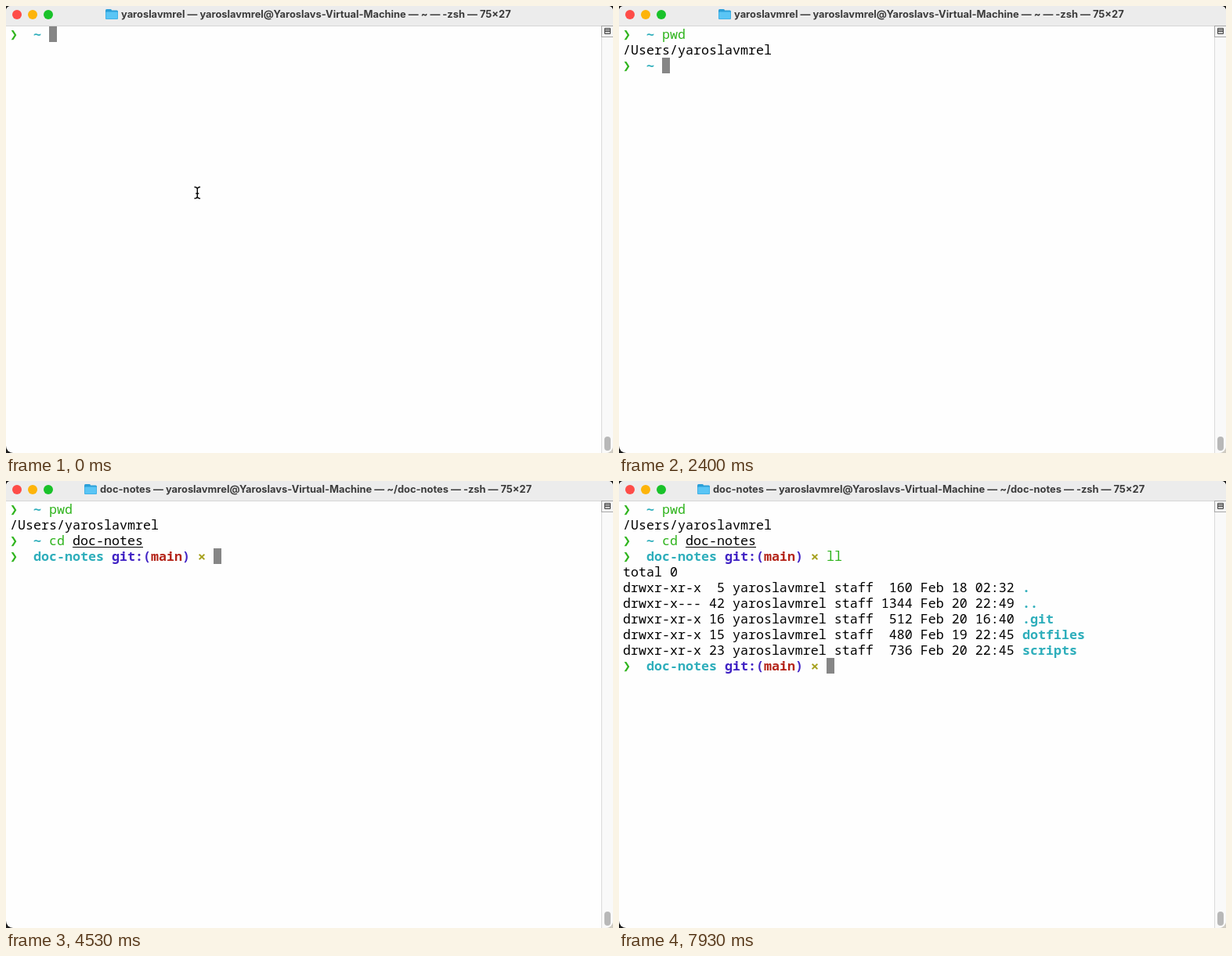
These frames come from a looping animation (775 by 571 pixels, 8000 ms). An HTML page with a canvas:

```html
<!DOCTYPE html>
<html lang="en">
<head>
<meta charset="utf-8">
<title>Terminal</title>
<style>
  html, body { margin: 0; width: 100%; height: 100%; overflow: hidden; background: #1c1c1c; }
  canvas { display: block; }
</style>
</head>
<body>
<canvas id="stage" width="775" height="571"></canvas>
<script>
const ctx = document.getElementById('stage').getContext('2d');
const LOOP = 8000, CELL = 10, ROW = 20, LEFT = 5, TOP = 26;
const GREEN = '#2fb41d', CYAN = '#2eaebb', RED = '#b42419', BLUE = '#4022c4',
      YELLOW = '#a5a01b', BLACK = '#000', GHOST = '#6e6e6e', BLOCK = '#868686';

const USER = 'yaroslavmrel', HOST = 'Yaroslavs-Virtual-Machine', FOLDER = 'doc-notes';
const KNOWN = ['pwd', 'cd', 'l', 'll'];

const homePrompt = [[0, '❯', GREEN], [3, '~', CYAN]];
const repoPrompt = [[0, '❯', GREEN], [3, FOLDER, CYAN], [13, 'git:(', BLUE],
                    [18, 'main', RED], [22, ')', BLUE], [24, '×', YELLOW]];

const listing = [
  ['drwxr-xr-x', 5, 160, 'Feb 18 02:32', '.'],
  ['drwxr-x---', 42, 1344, 'Feb 20 22:49', '..'],
  ['drwxr-xr-x', 16, 512, 'Feb 20 16:40', '.git'],
  ['drwxr-xr-x', 15, 480, 'Feb 19 22:45', 'dotfiles'],
  ['drwxr-xr-x', 23, 736, 'Feb 20 22:45', 'scripts'],
].map(([mode, links, size, date, name]) => [
  `${mode} ${String(links).padStart(2)} ${USER} staff ${String(size).padStart(4)} ${date}`, name]);

// keys: [time, number of characters typed so far]
const commands = [
  { row: 0, col: 5, prompt: homePrompt, text: 'pwd', start: 0, enter: 1330, done: 1470,
    keys: [[800, 1], [930, 2], [1070, 3]], output: [['/Users/' + USER]] },
  { row: 2, col: 5, prompt: homePrompt, text: 'cd ' + FOLDER, start: 1470, enter: 4270, done: 4330,
    keys: [[2600, 1], [2800, 2], [3070, 3], [3270, 4], [3470, 5], [3870, 12]], output: [] },
  { row: 3, col: 26, prompt: repoPrompt, text: 'll', start: 4330, enter: 6070, done: 6130,
    keys: [[5600, 1], [5800, 2]], output: [['total 0'], ...listing] },
  { row: 10, col: 26, prompt: repoPrompt, text: '', start: 6130, enter: Infinity, done: Infinity,
    keys: [], output: [] },
];

function rect(x, y, w, h, color, radius = 0) {
  ctx.fillStyle = color;
  ctx.beginPath();
  ctx.roundRect(x, y, w, h, radius);
  ctx.fill();
}

function put(row, col, text, color = BLACK, bold = false) {
  const isSymbol = /^[❯~×]$/.test(text);
  const family = isSymbol ? '"DejaVu Sans Mono"' : '"Noto Sans Mono"';
  ctx.font = `${bold ? 700 : 500} 16.667px ${family}, monospace`;
  ctx.fillStyle = color;
  ctx.fillText(text, LEFT + col * CELL, TOP + row * ROW + 16);
}

function block(row, col) {
  rect(LEFT + col * CELL, TOP + row * ROW, CELL, ROW, BLOCK);
}

function drawFolder(x) {
  rect(x, 4, 8, 6, '#2b9fd8', 1.5);
  rect(x, 5.5, 16, 11.5, '#2b9fd8', 1.5);
  rect(x + 0.5, 7.5, 15, 9, '#5ac5f5', 1);
}

function drawScrollbar() {
  rect(760, 26, 15, 545, '#f9f9f9', [0, 0, 9, 0]);
  rect(760, 26, 1, 545, '#dadada');
  rect(760, 25, 15, 15, '#a8a8a8');
  rect(761, 26, 14, 13, '#f4f4f4');
  rect(764, 28, 8, 8, '#444', 1);
  rect(765, 29, 6, 6, '#d0d0d0');
  rect(765, 30, 6, 1, '#444');
  rect(765, 32, 6, 1, '#444');
  rect(764, 550, 8, 18, '#b8b8b8', 4);
}

function drawWindow(t) {
  rect(0, 0, 775, 571, '#1c1c1c');
  rect(760, 560, 15, 11, '#cfcbc2');
  rect(0, 0, 775, 571, '#fefefe', [6, 6, 9, 9]);
  rect(0, 0, 775, 25, '#ececec', [6, 6, 0, 0]);
  rect(0, 25, 775, 1, '#d6d6d6');
  ['#fe4c48', '#fdb40a', '#19c22a'].forEach((c, i) => rect(8 + 20 * i, 5, 12, 12, c, 6));

  const inRepo = t >= 4330, x = inRepo ? 100 : 127;
  const place = inRepo ? FOLDER : USER, path = inRepo ? '~/' + FOLDER : '~';
  drawFolder(x);
  ctx.font = '700 12.88px Inter, sans-serif';
  ctx.fillStyle = '#3b3b3b';
  ctx.fillText(`${place} — ${USER}@${HOST} — ${path} — -zsh — 75×27`, x + 20, 15);
  drawScrollbar();
}

function drawTyped({ row, col, text }, count) {
  const typed = text.slice(0, count);
  const [name] = typed.split(' ');
  const known = KNOWN.includes(name);
  put(row, col, name, known ? GREEN : RED, !known);
  const arg = typed.slice(name.length + 1);
  if (!arg) return;
  const argCol = col + name.length + 1;
  put(row, argCol, arg);
  rect(LEFT + argCol * CELL, TOP + row * ROW + 18, arg.length * CELL, 1, BLACK);
}

function drawCommand(cmd, t) {
  const { row, col, prompt, text, keys, output } = cmd;
  for (const [c, part, color] of prompt) put(row, c, part, color, true);

  const count = keys.reduce((n, [time, typed]) => t >= time ? typed : n, 0);
  drawTyped(cmd, count);
  if (t < cmd.enter) {
    const ghost = count ? text.slice(count) : '';
    block(row, col + count);
    put(row, col + count, ghost.slice(0, 1), '#757575');
    put(row, col + count + 1, ghost.slice(1), GHOST);
    return;
  }
  output.forEach(([line, entry], i) => {
    put(row + 1 + i, 0, line);
    if (entry) put(row + 1 + i, 51, entry, CYAN, true);
  });
  if (t < cmd.done) block(row + 1 + output.length, 0);
}

function drawPointer() {
  ctx.strokeStyle = '#000';
  ctx.lineWidth = 1.4;
  ctx.stroke(new Path2D('M240.5 231.2Q244.3 231.2 244.3 234V243Q244.3 245.8 240.5 245.8' +
    'M248 231.2Q244.3 231.2 244.3 234M244.3 243Q244.3 245.8 248 245.8M242.3 239.5H246.3'));
}

function frame(now) {
  const t = now % LOOP;
  drawWindow(t);
  for (const cmd of commands) if (t >= cmd.start) drawCommand(cmd, t);
  if (t < commands[0].keys[0][0]) drawPointer();
  requestAnimationFrame(frame);
}
requestAnimationFrame(frame);
</script>
</body>
</html>
```
